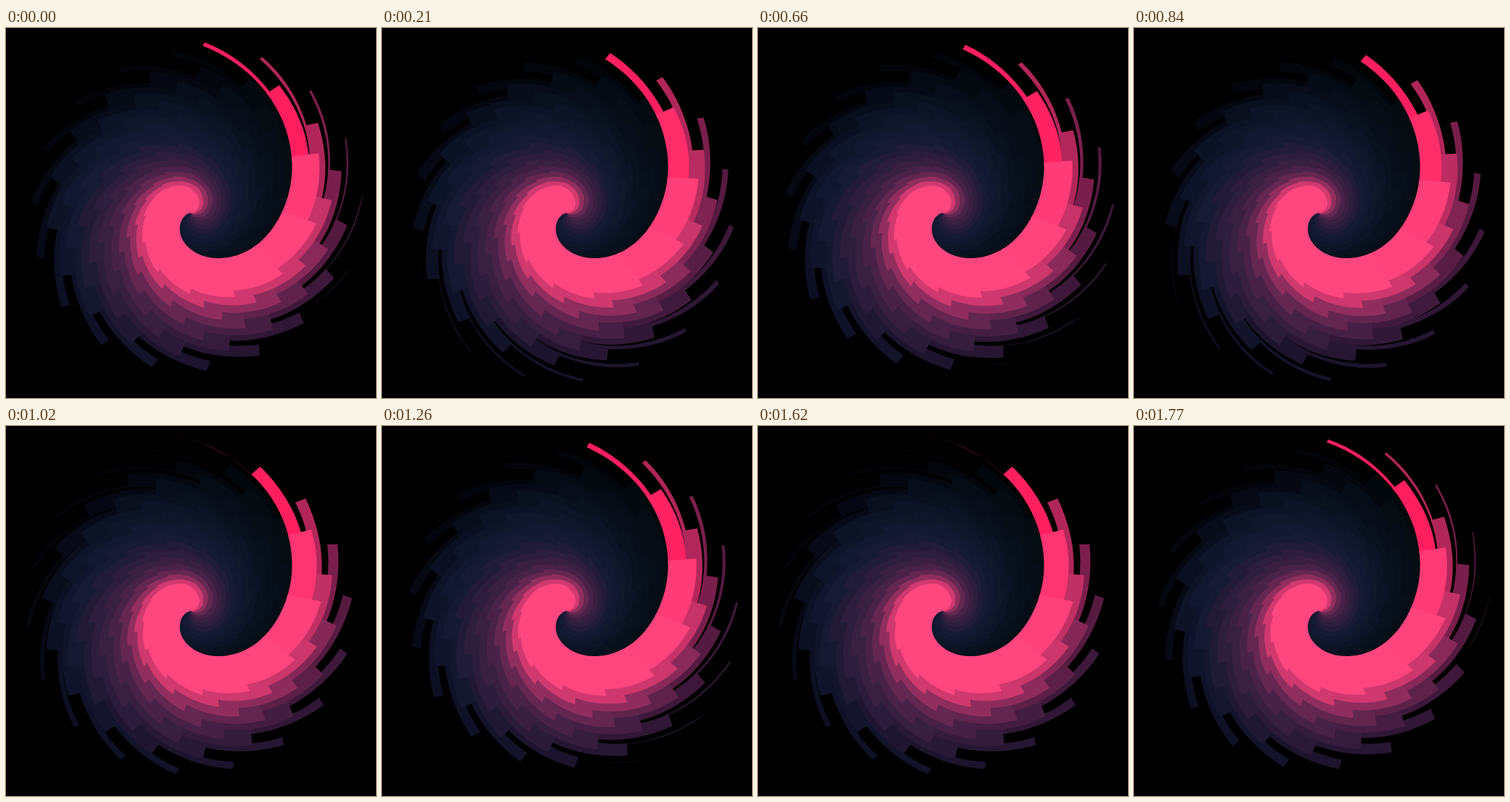
These frames come from a looping animation (500 by 500 pixels, 1800 ms). An HTML page with a canvas:

```html
<!DOCTYPE html>
<html>
<head>
<meta charset="utf-8">
<style>
html, body { margin: 0; height: 100%; overflow: hidden; background: #000; }
canvas { display: block; }
</style>
</head>
<body>
<canvas id="stage" width="500" height="500"></canvas>
<script>
const ctx = document.getElementById('stage').getContext('2d');
const ARMS = 18, PERIOD = 600, STEP = 30;
const SWEEP = 28.3;                       // degrees a block travels per period
const TURN = 20.05 + SWEEP / ARMS;        // rotation between arms
const BIRTH = 0.7, DEATH = 16.8;          // life of a block, in periods

// Radius of both edges of an arm after 0, 1, 2... periods
const INNER = [261, 226.5, 191.5, 156, 123.5, 97.5, 74, 53.5, 35, 17, 3, 0];
const OUTER = [249, 231.2, 210, 190.5, 170, 149, 128, 109, 92, 77, 64, 54, 45, 37, 27, 17, 6, 0];

const COLORS = ['ff1f5f', 'b02659', '7a1f4c', '551a40', '3e183a', '301735',
  '261632', '1c142d', '13132a', '0f1127', '0d1023', '0a0e1f',
  '080b19', '060915', '050811', '04080f', '03090f', '020a0f']
  .map(h => [0, 2, 4].map(i => parseInt(h.substr(i, 2), 16)));

// Smooth curve through evenly spaced values
function curve(list, x) {
  const i = Math.floor(x), f = x - i;
  const at = n => list[Math.max(0, Math.min(list.length - 1, n))];
  const a = at(i - 1), b = at(i), c = at(i + 1), d = at(i + 2);
  return Math.max(0, b + f / 2 * (c - a + f * (2 * a - 5 * b + 4 * c - d + f * (3 * (b - c) + d - a))));
}

// Arms brighten a little as their blocks move inwards
function shade(arm, age) {
  const rise = 1 - Math.exp(-1.2 * Math.max(0, age - 2));
  const glow = 1 + 0.18 * rise;
  const tip = arm > 10 ? Math.min(1, 0.35 + 0.25 * age) : 1;
  const share = arm ? Math.max(0.12, 0.4 - arm * 0.05) : 1;
  const lift = [0, 34, 15].map(v => v * rise * share);
  return 'rgb(' + COLORS[arm].map((v, i) => Math.min(255, Math.round((v * glow + lift[i]) * tip))) + ')';
}

function point(degrees, radius) {
  const a = degrees * Math.PI / 180;
  ctx.lineTo(250 + radius * Math.cos(a), 250 + radius * Math.sin(a));
}

function block(arm, age) {
  const top = curve(OUTER, age);
  const slant = 0.125 * (top - curve(INNER, age));
  const fall = Math.max(1.1, 1.75 - 0.06 * age);
  const scale = 1 - 0.0025 * arm;
  const angle = x => -86 + SWEEP * (x - 1) + TURN * arm;
  const N = 10, len = 1.06;
  ctx.beginPath();
  for (let j = 0; j <= N; j++) {
    const x = age + len * j / N;
    point(angle(x), scale * curve(INNER, x));
  }
  for (let j = N; j >= 0; j--) {
    const x = age + len * j / N;
    const r = top - fall * (top - curve(OUTER, x));
    point(angle(x) + slant, scale * Math.max(r, curve(INNER, x)));
  }
  ctx.fillStyle = shade(arm, age);
  ctx.fill();
}

function draw() {
  const t = Math.floor(performance.now() / STEP) * STEP % PERIOD / PERIOD;
  ctx.fillStyle = '#000';
  ctx.fillRect(0, 0, 500, 500);
  for (let arm = ARMS - 1; arm >= 0; arm--) {
    for (let k = 0; k < 19; k++) {
      const age = k + t - arm / ARMS;
      if (age >= BIRTH - 1e-6 && age < DEATH) block(arm, age);
    }
  }
  requestAnimationFrame(draw);
}
draw();
</script>
</body>
</html>
```
